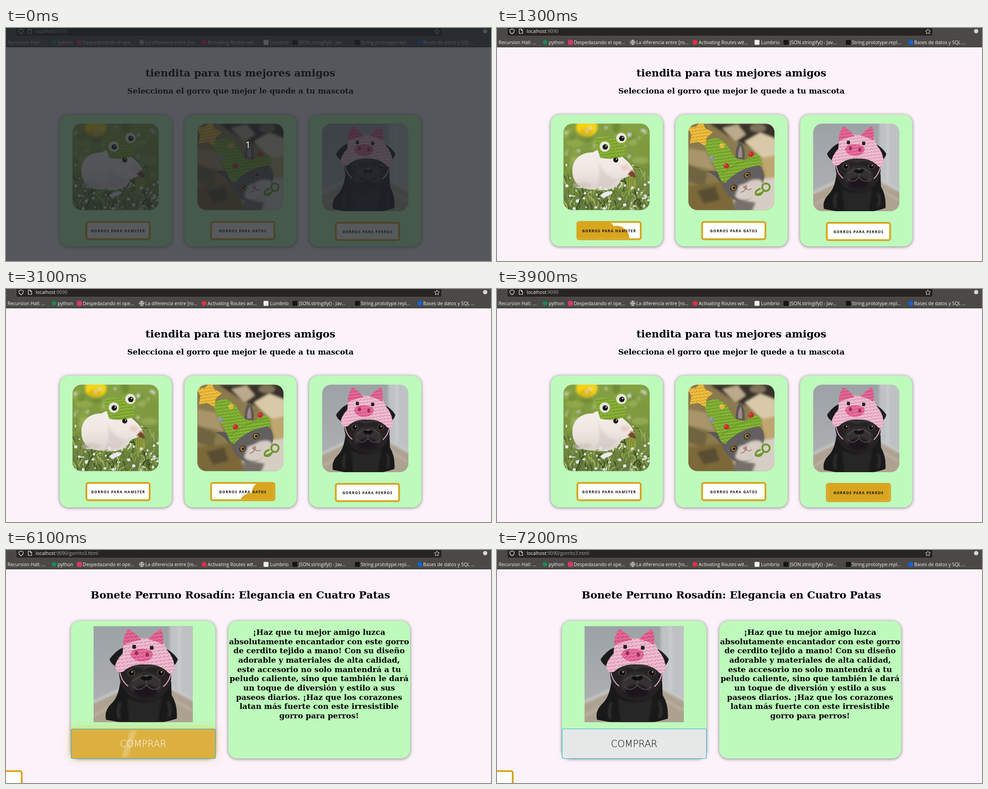
Animation of 1080 by 519 pixels, one loop 7.5 s. Source, as an HTML page:

```html
<!DOCTYPE html>
<html lang="es">
<head>
<meta charset="utf-8">
<style>
  html, body { margin: 0; width: 100%; height: 100%; overflow: hidden; background: #fbf2fa; }
  svg { display: block; width: 100%; height: 100%; }
  .ui { font: 10.5px Ubuntu, "Open Sans", "Noto Sans", sans-serif; fill: #f4f3f0; }
  .h1, .h2 { font-family: "DejaVu Serif", serif; font-weight: bold; text-anchor: middle; }
  .h1 { font-size: 22.83px; }
  .h2 { font-size: 17.12px; }
  .label { font: bold 8.1px "Open Sans", "Noto Sans", sans-serif; letter-spacing: 1.2px; text-anchor: middle; fill: #111; }
  .buy { font: 200 20.8px "DejaVu Sans", sans-serif; text-anchor: middle; }
  .card { fill: #bdfabb; filter: drop-shadow(0 1px 3.5px rgba(0, 0, 0, .5)); }
</style>
</head>
<body>
<svg id="stage" viewBox="0 0 1080 519" preserveAspectRatio="none"></svg>
<script>
const LOOP = 7500, STEP = 100, GOLD = '#d8a51f';
const DETAIL_AT = 4900;
const shopButtons = [
  { x: 177, y: 430, label: 'GORROS PARA HAMSTER', on: 910, off: 1742 },
  { x: 454.7, y: 430, label: 'GORROS PARA GATOS', on: 1950, off: 2740 },
  { x: 732.4, y: 432, label: 'GORROS PARA PERROS', on: 3300, off: Infinity },
];
const buy = { on: 5885, off: 6785, fade: 400, textFade: 250, shine: 500 };

// ---- shape helpers ----
const rect = (x, y, w, h, fill, more = '') => `<rect x="${x}" y="${y}" width="${w}" height="${h}" fill="${fill}" ${more}/>`;
const oval = (x, y, rx, ry, fill, more = '') => `<ellipse cx="${x}" cy="${y}" rx="${rx}" ry="${ry}" fill="${fill}" ${more}/>`;
const dot = (x, y, r, fill, more) => oval(x, y, r, r, fill, more);
const path = (d, fill, more = '') => `<path d="${d}" fill="${fill}" ${more}/>`;
const line = (d, color, w = 1, more = '') => path(d, 'none', `stroke="${color}" stroke-width="${w}" ${more}`);
const text = (x, y, cls, s, more = '') => `<text x="${x}" y="${y}" class="${cls}" ${more}>${s}</text>`;
const knit = (d, fill) => path(d, fill) + path(d, 'url(#knit)');
const times = (n, f) => Array.from({ length: n }, (_, i) => f(i)).join('');
const soft = s => `<g filter="url(#soft)">${s}</g>`;

function randomizer(seed) {
  return (lo, hi) => {
    seed = (seed * 16807) % 2147483647;
    return +(lo + (hi - lo) * seed / 2147483647).toFixed(1);
  };
}

// ---- pictures, each about 192 units square ----
function hamster() {
  const r = randomizer(7741);
  const blade = (color, top) => {
    const x = r(0, 192), y = r(top, 200);
    return line(`M${x} ${y}q${r(-5, 5)} -9 ${r(-12, 12)} ${r(-20, -7)}`, color, r(1, 2.6));
  };
  const petal = (lo, hi, size) => oval(r(0, 192), r(lo, hi), r(1, size), r(1, size), '#dfe3e8');
  const popEye = (x, y) => dot(x, y, 15, '#80ab2e') + dot(x, y, 11.5, '#e6e3db') + dot(x + 1, y + 1, 6, '#171815') + dot(x + 3, y - 1, 1.4, '#fff');
  return rect(0, 0, 192, 195, 'url(#meadow)')
    + soft(times(24, i => oval(r(0, 192), r(0, 95), r(8, 22), r(5, 16), ['#9fb653', '#5d7a2b', '#a9bd62', '#7c983b'][i % 4], 'opacity=".5"'))
      + oval(52, 8, 24, 20, '#f4d317') + oval(50, 19, 15, 8, '#dfb911') + times(16, () => petal(5, 80, 4.5)))
    + times(110, i => blade(['#445c26', '#84a145', '#a3b565', '#2f431e'][i % 4], 105))
    + times(35, () => petal(92, 190, 4))
    + path('M20 104C20 78 41 63 66 64C80 52 115 57 130 73C147 87 158 99 156 109C151 118 136 119 128 125C122 145 95 152 64 147C33 147 19 127 20 104Z', 'url(#fur)')
    + soft(path('M75 79Q91 121 121 125Q103 148 70 144Q88 120 75 79Z', '#cfc3bb', 'opacity=".5"') + oval(41, 137, 23, 6, '#c8beb6', 'opacity=".6"')
      + oval(137, 98, 10, 7, '#e8cfc6'))
    + knit('M71 43Q68 32 81 31Q98 25 113 34Q125 15 139 28Q142 41 134 50L141 70Q112 83 82 76Z', '#84ad30')
    + popEye(92, 51) + popEye(129, 32)
    + dot(116.5, 81, 5.6, '#1b1414') + dot(118, 79, 1.4, '#fff')
    + oval(152, 106, 5, 4, '#e1aaa1') + oval(151, 113, 8, 4, '#b77852') + path('M145 110l8 -5 5 6 4 8 -10 2z', '#754932')
    + oval(151, 134, 11, 16, '#929f40') + times(3, i => line(`M${146 + i * 5} 121q-3 13 0 26`, '#69772b', 1.2))
    + line('M128 119q-12 9 -10 23M128 130q5 6 -5 13', '#ddd6d2', 3)
    + times(70, i => blade(['#52702d', '#8dab4c', '#364a25', '#a4b567'][i % 4], 157))
    + times(26, () => petal(142, 192, 4))
    + oval(96, 157, 14, 5, '#e8e8ed', 'transform="rotate(-18 96 157)"') + line('M99 160q6 13 1 31', '#bac787', 2);
}

function cat() {
  const star = times(10, i => {
    const a = (i * 36 - 80) * Math.PI / 180, r = i % 2 ? 18 : 30;
    return `${i ? 'L' : 'M'}${(25 + r * Math.cos(a)).toFixed(1)} ${(23 + r * Math.sin(a)).toFixed(1)}`;
  }) + 'Z';
  const ball = (x, y, c) => dot(x, y, 6, c) + dot(x - 2, y - 2, 1.6, '#fff', 'opacity=".35"');
  const eye = (x, y) => oval(x, y, 8, 6.5, '#302d2a', `transform="rotate(-32 ${x} ${y})"`) + dot(x, y, 5.4, '#b98435') + dot(x + .7, y, 3, '#17130f');
  return rect(0, 0, 192, 195, '#8b7a4d')
    + soft(path('M0 55L40 62L60 105L0 90Z', '#a8966a') + path('M0 92L42 108L36 140L0 128Z', '#6f6340')
      + path('M48 0H195V45L150 55L105 38Z', '#37312a') + path('M76 10L110 2L128 24L105 40Z', '#bbaa8c')
      + path('M126 40L160 20L195 34V84L160 74Z', '#d8c9a8') + oval(155, 10, 18, 9, '#80735c')
      + path('M160 78L195 70V140L172 122Z', '#bfa570') + path('M0 140L78 130L110 195H0Z', '#7c6838')
      + path('M20 150L60 140L70 170L34 178Z', '#594d31'))
    + soft(path('M100 172C126 133 162 118 183 122L200 116V200H108Z', '#d6cec4') + path('M104 165L150 176L140 200H100Z', '#77706b'))
    + path('M40 107Q63 102 77 115L72 134Q60 112 40 107Z', '#5b5857')
    + path('M75 132C84 105 137 80 157 93C174 104 171 135 157 153C136 179 110 178 91 161Q77 147 75 132Z', '#625f5d')
    + soft(path('M113 137Q122 136 139 126Q166 119 168 137Q165 165 135 171Q107 172 104 160Z', '#d6ccc4'))
    + eye(131, 115) + eye(101, 143)
    + path('M121 141l9 -5 1 8q-6 4 -10 -3z', '#b9827f') + line('M127 145q-2 7 -11 8M128 145q7 5 13 0', '#706461', 1.2)
    + knit('M34 44Q48 30 67 33L84 44L104 76L126 82Q142 68 155 68Q168 82 162 92Q112 98 82 132Q70 128 68 114L60 98Q43 68 34 44Z', '#7db02d')
    + line('M74 113Q110 82 158 76', '#5f8d23', 2, 'opacity=".6"')
    + path('M106 77C104 58 110 43 117 40Q128 55 125 80Z', '#5b5857') + path('M111 75Q110 58 117 49Q121 61 120 76Z', '#9e8985')
    + knit(star, '#efbb35') + ball(85, 94, '#c92a2b') + ball(140, 68, '#c92a2b') + ball(75, 49, '#dfb53b') + ball(52, 78, '#8b9099')
    + line('M149 158Q164 157 170 147M165 145q-2 -11 8 -12 11 2 7 13 -7 9 -15 -1zm-4 0q-12 3 -11 12 9 6 15 -4', '#6d982d', 4);
}

function pug() {
  const eye = x => oval(x, 95, 8, 7, '#4a3a32') + dot(x, 95, 5.4, '#100e0e') + dot(x + 1.5, 93, 1.5, '#d0d6db');
  return rect(0, 0, 192, 195, 'url(#wall)')
    + soft(path('M147 -9H200V153L148 125Z', '#bfc2c4') + line('M166 0V140', '#d2d4d5', 3)
      + path('M-9 160L50 132L149 126L200 155V200H-9Z', '#ada291')
      + line('M-9 158L50 130M148 125L200 154', '#c9cac8', 5) + line('M0 182L40 160M155 150L192 172', '#c3b8a6', 3))
    + path('M52 112H150L151 140Q163 160 161 188L148 192L135 195H50L24 190Q20 172 34 158Q48 145 52 112Z', '#1a191a')
    + soft(path('M64 146Q96 164 132 144L124 195H70Z', '#282627') + line('M52 155Q45 171 50 188M144 154Q151 167 145 186', '#3b3838', 4))
    + path('M60 43Q46 46 31 67Q33 77 46 84L62 61ZM135 44Q152 50 163 67Q160 79 150 84L132 61Z', '#1c1b1c')
    + path('M50 76Q90 55 145 75Q154 95 148 118Q138 148 108 151Q72 153 60 130Q46 109 50 76Z', '#242223')
    + soft(oval(101, 118, 31, 24, '#363233') + oval(101, 132, 23, 13, '#1b191a') + line('M66 84Q84 76 98 85Q113 76 136 84', '#4c4647', 3))
    + eye(73) + eye(130)
    + oval(102, 104, 11, 7, '#111') + line('M102 110V120Q87 136 77 122M102 120Q118 136 129 122M76 112Q88 101 102 99Q119 99 129 112', '#4b4748', 2)
    + oval(102, 101, 5, 2, '#4c494a')
    + line('M51 94Q54 112 67 122M151 91Q148 111 135 123', '#dfa2bb', 2)
    + knit('M58 33Q77 22 105 25Q126 23 135 34L143 50Q157 66 157 88Q151 104 141 91Q124 76 101 78Q74 76 58 92Q42 98 42 79Q46 66 56 56Z', '#f3b8d0')
    + knit('M57 39Q57 19 67 6Q81 13 92 28Q75 31 57 39ZM106 27Q116 13 131 6Q137 20 134 38Q122 30 106 27Z', '#e55e90')
    + knit('M71 57Q74 45 94 46Q115 47 115 58Q112 71 93 72Q75 71 71 57Z', '#e9659a')
    + oval(83, 55, 3.5, 4.5, '#9c2e5d') + oval(104, 58, 3.5, 4.5, '#9c2e5d')
    + rect(75, 38, 7, 8, '#231e20', 'rx="2"') + rect(109, 40, 7, 8, '#231e20', 'rx="2"');
}

// ---- page parts ----
function bookmark(x, label, mark) {
  return mark + text(x, 35.7, 'ui', label);
}

function toolbar() {
  const globe = line('M297 32a5.2 5.2 0 1 0 10.4 0a5.2 5.2 0 1 0 -10.4 0H307.4M302.2 27V37M302.2 27q-5 5 0 10q5 -5 0 -10', '#e8e7e4');
  const square = (x, color) => rect(x, 26.5, 11, 11, color, 'rx="1.5"');
  return rect(0, 0, 1080, 43, '#4a4946') + rect(0, 42, 1080, 1, '#2c2b29')
    + rect(22.5, -8, 948, 26, '#262522', 'rx="4" stroke="#5a5854"')
    + line('M33.5 2Q36 4 38.5 4Q39 10 33.5 13Q28 10 28.5 4Q31 4 33.5 2ZM49.5 2.5H54L57 5.5V12H49.5ZM54 2.5V5.5H57', '#e9e8e5', 1.2)
    + text(66, 11, 'ui', 'localhost<tspan id="route" fill="#aaa8a3"></tspan>')
    + line('M959.5 2L961.2 5.7L965 6.2L962.2 9L963 13L959.5 11L956 13L956.8 9L954 6.2L957.8 5.7Z', '#e9e8e5')
    + dot(1067, 7, 4.8, '#d7d6d3')
    + text(-3, 35.7, 'ui', 't Recursion Hall: …')
    + bookmark(115, 'python', dot(107, 32, 5, '#168b58'))
    + bookmark(171, 'Despedazando el ope…', square(158, '#d83968'))
    + bookmark(310, 'La diferencia entre [ro…', globe)
    + bookmark(449, 'Activating Routes wit…', dot(441, 32, 5.6, '#df3041'))
    + bookmark(588, 'Lumbrio', square(573.5, '#eeeeeb'))
    + bookmark(652, 'JSON.stringify() - Jav…', square(638, '#151515'))
    + bookmark(790, 'String.prototype.repl…', square(777, '#151515'))
    + bookmark(929, 'Bases de datos y SQL …', dot(921.5, 32, 5.6, '#1262d4'));
}

const card = (x, y, w, h) => `<rect class="card" x="${x}" y="${y}" width="${w}" height="${h}" rx="20"/>`;
const frame = (x, y, w, h) => rect(x, y, w, h, GOLD, 'rx="6"') + rect(x + 4, y + 4, w - 8, h - 8, '#fffffc', 'rx="2"');

function shopPage() {
  const photos = [hamster(), cat(), pug()];
  return text(522, 108, 'h1', 'tiendita para tus mejores amigos')
    + text(522, 146, 'h2', 'Selecciona el gorro que mejor le quede a tu mascota')
    + shopButtons.map((b, i) => {
      const left = 119.5 + 277.75 * i;
      return card(left, 193, 250, 293.5)
        + `<g transform="translate(${148 + 278 * i} 213)" clip-path="url(#${i < 2 ? 'round' : 'tall'})">${photos[i]}</g>`
        + frame(b.x, b.y, 145, 42.5)
        + `<g transform="translate(${b.x + 4} ${b.y + 4})" clip-path="url(#inner)">${times(4, () => `<ellipse class="bubble" fill="${GOLD}"/>`)}</g>`
        + text(b.x + 72.8, b.y + 24.8, 'label', b.label);
    }).join('');
}

function detailPage() {
  const story = ['¡Haz que tu mejor amigo luzca', 'absolutamente encantador con este gorro',
    'de cerdito tejido a mano! Con su diseño', 'adorable y materiales de alta calidad,',
    'este accesorio no solo mantendrá a tu', 'peludo caliente, sino que también le dará',
    'un toque de diversión y estilo a sus', 'paseos diarios. ¡Haz que los corazones',
    'latan más fuerte con este irresistible', 'gorro para perros!'];
  return text(522, 108, 'h1', 'Bonete Perruno Rosadín: Elegancia en Cuatro Patas')
    + card(144.5, 158, 322, 306.5) + card(495, 158, 405, 306.5)
    + `<g transform="translate(195 169.5) scale(1.151 1.097)" clip-path="url(#plain)">${pug()}</g>`
    + story.map((s, i) => text(697.2, 189 + i * 20.67, 'h2', s)).join('')
    + rect(143, 396, 325, 70, '#f2b63c', 'id="glow" rx="4" filter="url(#halo)"')
    + rect(145, 398.5, 321.5, 66, '#e6e8e7', 'id="buy" rx="3" stroke="#20b7dc" stroke-width="1.2"')
    + `<g clip-path="url(#buyClip)">${rect(-7, -29, 14, 58, '#fff', 'id="shine" filter="url(#blur)"')}</g>`
    + text(305.5, 438.5, 'buy', 'COMPRAR', 'id="buyText"')
    + frame(-108, 490.5, 145, 42.5);
}

const clip = (id, x, y, w, h, r) => `<clipPath id="${id}">${rect(x, y, w, h, '#000', `rx="${r}"`)}</clipPath>`;
const blur = (id, size) => `<filter id="${id}" x="-50%" y="-50%" width="200%" height="200%"><feGaussianBlur stdDeviation="${size}"/></filter>`;
const fade = (id, ...colors) => `<linearGradient id="${id}" x2="0" y2="1">${colors.map((c, i) => `<stop offset="${i / (colors.length - 1)}" stop-color="${c}"/>`).join('')}</linearGradient>`;

document.getElementById('stage').innerHTML = `<defs>
  ${clip('round', 0, 0, 192, 192.5, 20)}${clip('tall', 0, 0, 192, 195, 20)}${clip('plain', 0, 0, 192, 195, 0)}
  ${clip('inner', 0, 0, 137, 34.5, 2)}${clip('buyClip', 145.5, 399, 320.5, 65, 3)}
  ${blur('soft', 2.5)}${blur('blur', 2.5)}${blur('halo', 9)}
  ${fade('meadow', '#84a043', '#7f9a40', '#72893f', '#66793f')}
  ${fade('fur', '#f4eeea', '#efe7e2', '#dbd1ca')}${fade('wall', '#9da2a6', '#b0b3b5')}
  <pattern id="knit" width="8" height="7" patternUnits="userSpaceOnUse" patternTransform="rotate(-8)">
    ${line('M0 2q4 5 8 0M4 6q2 -1 4 -3', '#242514', 1.2, 'opacity=".2"')}${line('M0 0q4 4 8 0', '#fff', 1, 'opacity=".2"')}
  </pattern></defs>
  ${rect(0, 0, 1080, 519, '#fbf2fa')}
  <g id="shop">${shopPage()}</g><g id="detail">${detailPage()}</g>${toolbar()}
  <g id="countdown">${rect(0, 0, 1080, 519, 'rgba(30,35,40,.75)')}
  ${text(539, 267, '', '1', 'fill="#fff" text-anchor="middle" font-size="20" font-family="Ubuntu, Open Sans, sans-serif"')}</g>`;

// ---- motion ----
const el = id => document.getElementById(id);
const bubbles = [...document.querySelectorAll('.bubble')];
const clamp = x => Math.max(0, Math.min(1, x));
const mix = (a, b, p) => a + (b - a) * p;
const blend = (a, b, p) => `rgb(${a.map((v, i) => Math.round(mix(v, b[i], p)))})`;
const show = (id, on) => el(id).setAttribute('display', on ? 'inline' : 'none');
const set = (node, attrs) => Object.entries(attrs).forEach(([k, v]) => node.setAttribute(k, v));

// cubic-bezier(.25, .1, .25, 1)
function ease(x) {
  x = clamp(x);
  if (x === 0 || x === 1) return x;
  let lo = 0, hi = 1, u;
  for (let i = 0; i < 24; i++) {
    u = (lo + hi) / 2;
    if (.75 * u * (1 - u) + u ** 3 < x) lo = u; else hi = u;
  }
  return .3 * u * (1 - u) ** 2 + 3 * u * u * (1 - u) + u ** 3;
}
const hover = (t, { on, off }, duration, delay = 0) =>
  ease((t - on - delay) / duration) - ease((t - off - delay) / duration);

function render(t) {
  const detail = t >= DETAIL_AT;
  show('countdown', t < 100);
  show('shop', !detail);
  show('detail', detail);
  el('route').textContent = detail ? ':9090/gorrito3.html' : ':9090';

  bubbles.forEach((bubble, i) => {
    const n = i % 4, p = hover(t, shopButtons[(i - n) / 4], 500, n * 100);
    set(bubble, { cx: 137 * (n + .5) / 4, cy: 17.25 + 52.5 * (1 - p), rx: 17.1 * (1 + p), ry: 17.5 * (1 + p) });
  });

  const p = hover(t, buy, buy.fade), s = clamp((t - buy.on) / buy.shine);
  set(el('buy'), { fill: blend([230, 232, 231], [218, 165, 32], p) });
  set(el('buyText'), { fill: blend([0, 0, 0], [255, 255, 255], hover(t, buy, buy.textFade)) });
  set(el('glow'), { opacity: .55 * p });
  set(el('shine'), {
    transform: `translate(${136 + 321 * s} 431.5) skewX(-19)`,
    opacity: .3 * (1 - Math.abs(2 * s - 1)),
  });
}

const start = performance.now();
function tick() {
  const t = (performance.now() - start) % LOOP;
  render(Math.floor(t / STEP) * STEP);
  requestAnimationFrame(tick);
}
tick();
</script>
</body>
</html>
```
